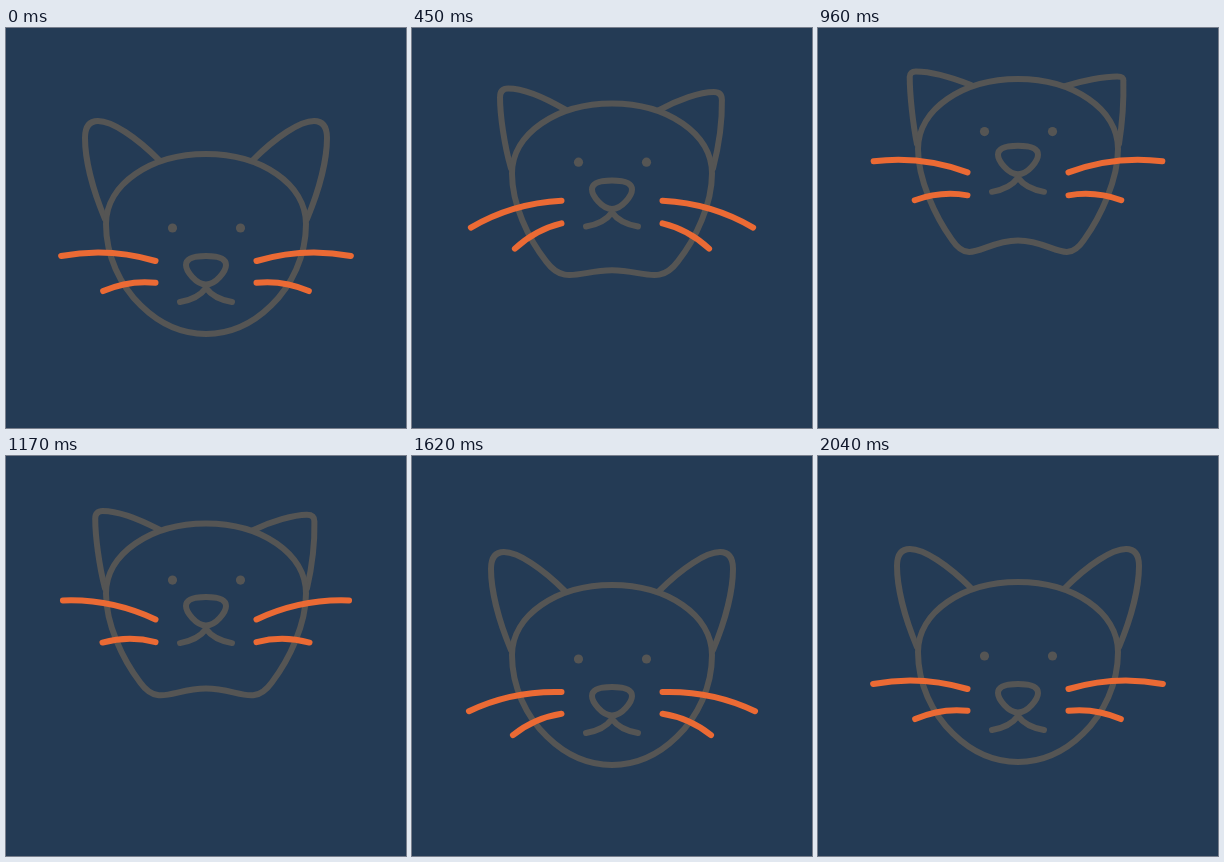
These frames come from a looping animation (400 px wide and 400 px high, 2340 ms). An HTML page:

```html
<!DOCTYPE html>
<html lang="en">
<head>
<meta charset="utf-8">
<title>Jumping cat</title>
<style>
  html, body { margin: 0; width: 100%; height: 100%; overflow: hidden; background: #243b55; }
  svg { display: block; width: 100%; height: 100%; }
  path { fill: none; stroke: #555554; stroke-width: 6; stroke-linecap: round; stroke-linejoin: round; }
  circle { fill: #555554; }
  .whisker path { stroke: #eb6a34; }
</style>
</head>
<body>
<svg viewBox="0 0 400 400">
  <g id="cat">
    <path id="earL"/>
    <path id="earR"/>
    <path id="head"/>
    <g id="eyes"><circle cx="166.5" cy="200" r="4.6"/><circle cx="234.5" cy="200" r="4.6"/></g>
    <g id="nose">
      <path d="M200 228C188 228 180 230 180 237C180 243 190 256.5 200 256.5C210 256.5 220 243 220 237C220 230 212 228 200 228Z"/>
      <path d="M174 274Q192 271 200 260Q208 271 226 274"/>
    </g>
    <g id="left" class="whisker">
      <path id="upper" d="M0 0Q-48 -11.5 -94.5 0"/>
      <path id="lower" d="M0 0Q-26 -7 -53 0"/>
    </g>
    <use href="#left" transform="translate(400) scale(-1 1)"/>
  </g>
</svg>
<script>
const LOOP = 2340, STEP = 30, LAST = 2040, RISE = 76;
const $ = id => document.getElementById(id);

// Each shape has a resting outline and an airborne outline.
const shapes = {
  earL: ["M99 191C86 160 79 130 79 110C79 98 84 93 92 93C106 93 130 109 153 132",
         "M99 115C95 95 92 65 92 48C92 45 94 43 98 43C112 43 132 48 153 56"],
  earR: ["M301 191C314 160 321 130 321 110C321 98 316 93 308 93C294 93 270 109 247 132",
         "M301 115C304 95 305.5 70 305 52C305 49 303 48 299 48C286 48 264 52 247 57"],
  head: [mirrored("200 126 145 126 100 156 100 196 100 228 114.2 257.3 135 277.7 152.5 294.8 175 306 200 306"),
         mirrored("200 50 145 50 100 80 100 120 100 150 117 187 134 211 152 238 165 211 200 211")]
};

// Closed path from the points of its left half.
function mirrored(half) {
  const n = half.split(" ").map(Number), pts = [];
  for (let i = 0; i < n.length; i += 2) pts.push([n[i], n[i + 1]]);
  const right = pts.slice(0, -1).reverse().map(([x, y]) => [400 - x, y]);
  const [start, ...rest] = pts.concat(right);
  return `M${start.join(" ")}C${rest.map(p => p.join(" ")).join(" ")}Z`;
}

const mix = (a, b, u) => a + (b - a) * u;
const sine = u => (1 - Math.cos(Math.PI * u)) / 2;
const quadOut = u => 1 - (1 - u) ** 2;
const fall = u => u ** 3.2;

// Keys: [time, value, easing used to reach it]
const jump = [[0, 0], [200, -.115, sine], [760, 1.01, quadOut], [1425, -.115, fall], [1750, 0, sine], [LAST, 0, sine]];
const squash = [[0, 0], [200, 0, sine], [760, 1, quadOut], [1425, 0, fall], [LAST, 0, sine]];
const swing = [[0, -3], [400, 16.8, sine], [1170, -11.6, sine], [1620, 11.7, sine], [LAST, -3, sine]];

function valueAt(keys, t) {
  const i = Math.max(1, keys.findIndex(k => k[0] >= t));
  const [t0, a] = keys[i - 1], [t1, b, ease] = keys[i];
  return mix(a, b, ease((t - t0) / (t1 - t0)));
}

function morph([a, b], p) {
  const to = b.match(/[\d.]+/g);
  let i = 0;
  return a.replace(/[\d.]+/g, v => mix(+v, +to[i++], p).toFixed(2));
}

function place(id, x, y, angle = 0) {
  $(id).setAttribute("transform", `translate(${x} ${y}) rotate(${angle})`);
}

function draw(now) {
  const t = Math.min(LAST, Math.floor(now % LOOP / STEP) * STEP);
  const p = valueAt(squash, t), tilt = valueAt(swing, t);
  // The outlines already rise with the squash; add only the rest of the jump.
  place("cat", 0, RISE * (p - valueAt(jump, t)));
  for (const id in shapes) $(id).setAttribute("d", morph(shapes[id], p));
  place("eyes", 0, -98 * p);
  place("nose", 0, -112 * p);
  place("upper", 149.5, 233 - 90 * p, -tilt);
  place("lower", 149.5, 254.8 - 88.8 * p, -tilt - 12);
}

const start = performance.now();
function frame() {
  draw(performance.now() - start);
  requestAnimationFrame(frame);
}
frame();
</script>
</body>
</html>
```
